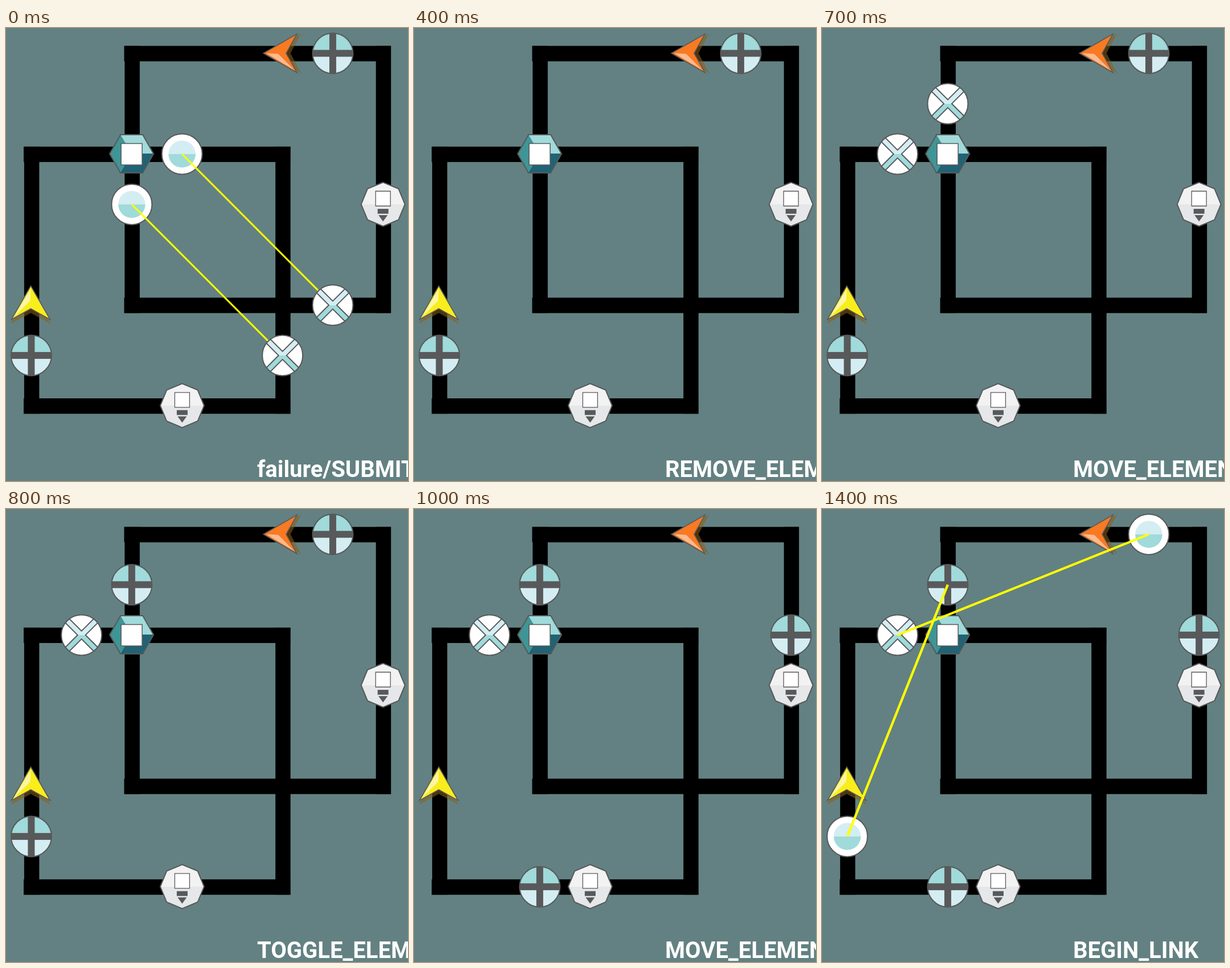
Write an HTML page with a canvas that moves like this. It is 706 px wide and 794 px high and loops after 1500 ms.

```html
<!DOCTYPE html>
<html lang="en">
<head>
<meta charset="utf-8">
<title>Track puzzle replay</title>
<style>
  html, body { margin: 0; width: 100%; height: 100%; overflow: hidden; background: #638182; }
  canvas { display: block; }
</style>
</head>
<body>
<canvas id="stage" width="706" height="794"></canvas>
<script>
const ctx = document.getElementById('stage').getContext('2d');
const STEP = 100;
const CELL = 88.25;
const DARK = '#58595b', PALE = '#d4edf3', AQUA = '#a0dada';
const at = cell => 44.4 + cell * CELL;

// Board actions, one per step: a label and the change it makes.
const steps = [
  ['failure/SUBMIT', s => {
    s.items = {
      '0,6': 'plus', '6,0': 'plus',
      '3,2': 'signal', '2,3': 'signal',
      '6,5': 'gate', '5,6': 'gate'
    };
    s.links = [['3,2', '6,5'], ['2,3', '5,6']];
    s.drags = [];
  }],
  ['REMOVE_ELEMENT', s => remove(s, '5,6')],
  ['REMOVE_ELEMENT', s => remove(s, '6,5')],
  ['REMOVE_ELEMENT', s => remove(s, '3,2')],
  ['REMOVE_ELEMENT', s => remove(s, '2,3')],
  ['ADD_ELEMENT', s => s.items['1,2'] = 'gate'],
  ['ADD_ELEMENT', s => s.items['2,1'] = 'gate'],
  ['MOVE_ELEMENT', () => {}],
  ['TOGGLE_ELEMENT', s => s.items['2,1'] = 'plus'],
  ['MOVE_ELEMENT', s => move(s, '0,6', '2,7')],
  ['MOVE_ELEMENT', s => move(s, '6,0', '7,2')],
  ['ADD_ELEMENT', s => s.items['0,6'] = 'signal'],
  ['ADD_ELEMENT', s => s.items['6,0'] = 'signal'],
  ['BEGIN_LINK', s => s.drags.push(['0,6', '2,1'])],
  ['BEGIN_LINK', s => s.drags.push(['6,0', '1,2'])]
];

function remove(s, key) {
  delete s.items[key];
  s.links = s.links.filter(link => !link.includes(key));
}

function move(s, from, to) {
  s.items[to] = s.items[from];
  delete s.items[from];
}

function stateAt(index) {
  const s = {};
  for (let i = 0; i <= index; i++) steps[i][1](s);
  return s;
}

const position = key => key.split(',').map(n => at(+n));

function place(x, y, draw, angle = 0) {
  ctx.save();
  ctx.translate(x, y);
  ctx.rotate(angle);
  draw();
  ctx.restore();
}

function polygon(points, fill, stroke, width = 2) {
  ctx.beginPath();
  points.forEach(([x, y]) => ctx.lineTo(x, y));
  ctx.closePath();
  if (fill) { ctx.fillStyle = fill; ctx.fill(); }
  if (stroke) { ctx.strokeStyle = stroke; ctx.lineWidth = width; ctx.stroke(); }
}

function disc(r, fill, stroke) {
  ctx.beginPath();
  ctx.arc(0, 0, r, 0, Math.PI * 2);
  if (fill) { ctx.fillStyle = fill; ctx.fill(); }
  if (stroke) { ctx.strokeStyle = stroke; ctx.lineWidth = 2; ctx.stroke(); }
}

function halves(r, top, bottom) {
  disc(r, top);
  ctx.beginPath();
  ctx.arc(0, 0, r, 0, Math.PI);
  ctx.fillStyle = bottom;
  ctx.fill();
}

function rect(x, y, w, h, fill) {
  ctx.fillStyle = fill;
  ctx.fillRect(x, y, w, h);
}

const shapes = {
  signal() {
    disc(35.5, '#fff', DARK);
    halves(23.7, PALE, AQUA);
  },
  plus() {
    halves(35.5, AQUA, PALE);
    rect(-35, -6, 70, 12, DARK);
    rect(-6, -35, 12, 70, DARK);
    disc(35.5, null, DARK);
  },
  gate() {
    disc(35.5, '#fff');
    ctx.save();
    ctx.beginPath();
    ctx.arc(0, 0, 35.5, 0, Math.PI * 2);
    ctx.clip();
    const n = 7, f = 40;
    const cross = [
      [0, -n], [f - n, -f], [f, -f + n], [n, 0], [f, f - n], [f - n, f],
      [0, n], [n - f, f], [-f, f - n], [-n, 0], [-f, n - f], [n - f, -f]
    ];
    const shade = ctx.createLinearGradient(0, -1, 0, 1);
    shade.addColorStop(0.5, PALE);
    shade.addColorStop(0.5, AQUA);
    polygon(cross, shade, DARK);
    ctx.restore();
    disc(35.5, null, DARK);
  }
};

function hexagon() {
  const a = [-19.5, -33.5], b = [19.5, -33.5], c = [38.5, 0];
  const d = [19.5, 33.5], e = [-19.5, 33.5], f = [-38.5, 0], o = [0, 0];
  polygon([a, o, e, f], '#3f9595');
  polygon([a, b, c, o], AQUA);
  polygon([o, c, d, e], '#206374');
  polygon([a, b, c, d, e, f], null, DARK);
  polygon([[-18.5, -18], [18.5, -18], [18.5, 19.5], [-18.5, 19.5]], '#fff', DARK, 1.5);
}

function depot() {
  const ring = Array.from({ length: 8 }, (_, i) =>
    [38.5 * Math.cos(i * Math.PI / 4), 38.5 * Math.sin(i * Math.PI / 4)]);
  polygon(ring, '#f2f2f3');
  polygon(ring.slice(0, 5), '#e6e7e8');
  polygon(ring, null, DARK);
  polygon([[-13, -23], [13, -23], [13, 3], [-13, 3]], '#fff', DARK, 1.3);
  rect(-9.5, 8, 19, 8.5, DARK);
  polygon([[-8, 19], [8, 19], [0, 30]], DARK);
}

function arrow(color, light) {
  const body = [[0, -33], [34, 26], [0, 7], [-34, 26]];
  polygon(body.map(([x, y]) => [x * 1.03, y + 7.5]), 'rgba(140,95,25,.55)');
  polygon(body, color, DARK, 1.6);
  polygon([[0, -28], [-1, -7], [-30, 22]], light);
}

function track(col, row) {
  const x = at(col), y = at(row), side = 5 * CELL;
  for (const d of [0, side]) {
    rect(x - 13.4, y + d - 13, side + 27, 27, '#000');
    rect(x + d - 12.5, y - 13, 26.5, side + 27, '#000');
  }
}

function line([from, to], width) {
  ctx.beginPath();
  ctx.moveTo(...position(from));
  ctx.lineTo(...position(to));
  ctx.strokeStyle = '#ff0';
  ctx.lineWidth = width;
  ctx.stroke();
}

function render(index) {
  const s = stateAt(index);
  const drawItems = gates => {
    for (const [key, kind] of Object.entries(s.items))
      if ((kind === 'gate') === gates) place(...position(key), shapes[kind]);
  };

  rect(0, 0, 706, 794, '#638182');
  track(0, 2);
  track(2, 0);
  place(43.5, 485, () => arrow('#f9ed1c', '#fbf5a6'));
  place(485, 44.3, () => arrow('#f97a22', '#fbba8e'), -Math.PI / 2);
  place(220.6, 220.5, hexagon);
  place(at(7), 309, depot);
  place(309.4, 661.8, depot);
  drawItems(false);
  s.links.forEach(link => line(link, 3));
  drawItems(true);
  s.drags.forEach(link => line(link, 4.2));

  ctx.font = 'bold 40px Roboto, sans-serif';
  ctx.fillStyle = '#fff';
  ctx.fillText(steps[index][0], 441, 787);
}

const start = performance.now();
function tick() {
  const elapsed = Math.max(0, performance.now() - start);
  render(Math.floor(elapsed / STEP) % steps.length);
  requestAnimationFrame(tick);
}
tick();
</script>
</body>
</html>
```
